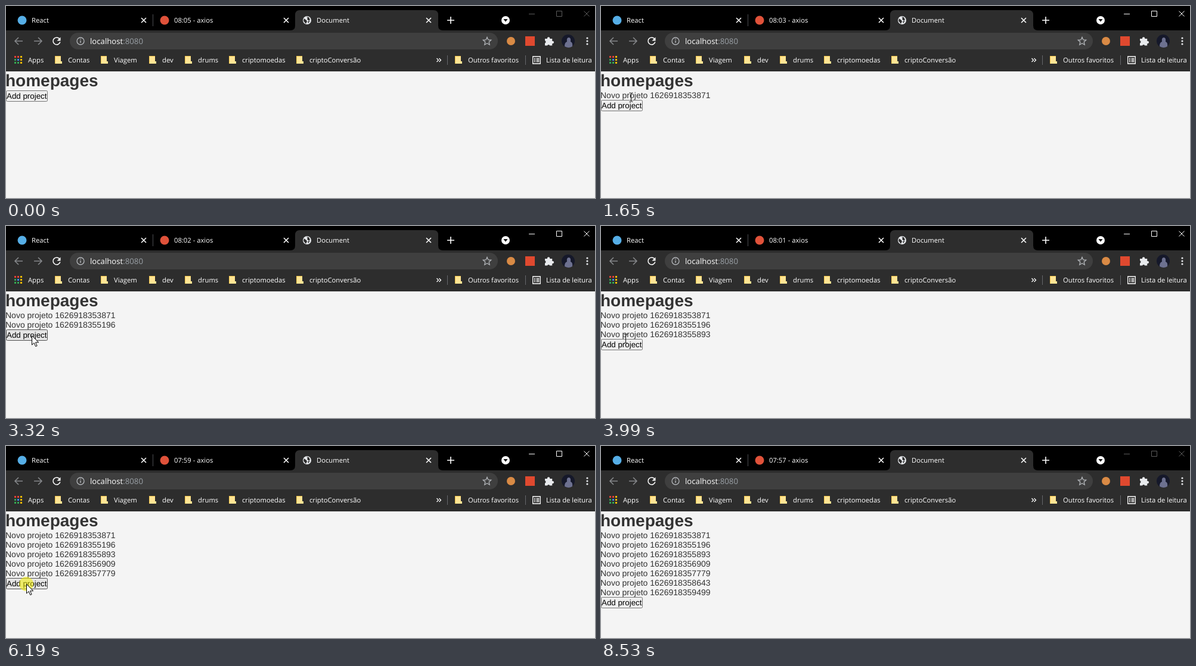
An HTML page that plays this animation: 988 px wide and 323 px high, repeating every 8660 ms.

```html
<!DOCTYPE html>
<html lang="pt">
<head>
<meta charset="utf-8">
<title>homepages</title>
<style>
  html, body { margin: 0; width: 100%; height: 100%; overflow: hidden; background: #f4f4f4; }
  svg { display: block; width: 988px; height: 323px; }
  text { white-space: pre; text-rendering: geometricPrecision; }
  .ui { font: 11.25px "Open Sans", "Noto Sans", sans-serif; fill: #fff; }
  .url { font-size: 13.2px; }
  .page { font: 14px "Liberation Sans", Arial, sans-serif; fill: #333; }
  .page .title { font-weight: bold; font-size: 28px; }
  .page .label { font-size: 13.333px; fill: #000; }
  .line { fill: none; stroke: #fff; stroke-width: 1.6; }
  .dim { stroke: #85878a; }
  #button rect { fill: #efefef; stroke: #767676; }
  #button.hover rect { fill: #e5e5e5; stroke: #4f4f4f; }
  #button.active rect { fill: #f5f5f5; stroke: #8d8d8d; }
  #win { fill: none; stroke: #fff; }
  #win.idle { stroke: #5c5c5c; }
</style>
</head>
<body>
<svg viewBox="0 0 988 323">
  <rect width="988" height="323" fill="#f4f4f4"/>

  <g class="page">
    <text class="title" x="-1" y="135">homepages</text>
    <g id="list"></g>
    <g id="button">
      <rect x=".5" y=".5" width="69" height="18" rx="2"/>
      <text class="label" x="1" y="14">Add project</text>
    </g>
  </g>

  <!-- tab strip -->
  <rect width="988" height="41"/>
  <rect y="41" width="988" height="69" fill="#2d2d2d"/>
  <path d="M477 41q8 0 8-8V15q0-8 8-8H717q8 0 8 8V33q0 8 8 8z" fill="#2d2d2d"/>
  <path d="M246.500 14V34" stroke="#4a4c50"/>
  <circle cx="27" cy="24" r="7.500" fill="#56aee6"/>
  <circle cx="266" cy="24" r="7.500" fill="#e0523a"/>
  <g fill="#2d2d2d">
    <circle cx="505" cy="24" r="7" fill="#e8eaed"/>
    <path d="M500 21l4 3 1 2-2 4-4-5zM504 18l4 1 2 4-2 2-3-3 1-2zM506 26l4-1-3 4z"/>
  </g>
  <path class="line" d="M740 24h12M746 18v12" stroke-width="1.800"/>
  <circle cx="838" cy="24" r="7" fill="#fff"/>
  <path d="M834.500 22h7l-3.500 4.500z"/>
  <g id="win" class="idle">
    <path d="M877 13.500h10M923.500 8.500h9v9h-9zM969.500 8.500l9 9m0-9l-9 9"/>
  </g>

  <!-- toolbar -->
  <path class="line dim" d="M28 59H15M21 53l-6 6 6 6M47 59h13M54 53l6 6-6 6"/>
  <path class="line" d="M89.500 55a6 6 0 1 0 1.300 5.500"/>
  <path d="M91.500 52.500v6h-6z" fill="#fff"/>
  <rect x="107" y="45" width="718" height="28" rx="14" fill="#3f3f3f"/>
  <circle class="line" cx="125" cy="59" r="6" style="stroke:#b4b7bb;stroke-width:1.300"/>
  <path d="M125 58v4M125 55v1.500" stroke="#b4b7bb" stroke-width="1.400"/>
  <path class="line" style="stroke:#b4b7bb;stroke-width:1.300"
    d="M807 52.500l1.900 4.400 4.800.4-3.600 3.200 1.100 4.700-4.200-2.500-4.200 2.500 1.100-4.700-3.600-3.200 4.800-.4z"/>
  <circle cx="847" cy="59" r="7" fill="#d98a45"/>
  <rect x="871" y="51" width="16" height="16" fill="#e0492f"/>
  <path fill="#e8eaed" d="M904 55h4a2.200 2.200 0 1 1 4.200 0h4v4a2.200 2.200 0 1 1 0 4.200v3.300h-4a2.200 2.200 0 0 0-4.200 0h-4v-4a2.200 2.200 0 0 0 0-4.200z"/>
  <circle cx="943" cy="59" r="11" fill="#15182a"/>
  <path d="M937 68q0-7 4-8-1-7 3-7t3 7q4 1 3 8-6 4-13 0z" fill="#6d7190"/>
  <g fill="#e8eaed">
    <circle cx="975" cy="54" r="1.600"/><circle cx="975" cy="59" r="1.600"/><circle cx="975" cy="64" r="1.600"/>
  </g>

  <!-- bookmarks bar -->
  <path d="M740.500 83v16M871.500 83v16" stroke="#66686b"/>
  <path class="line" style="stroke-width:1.300" d="M722.500 88l3 3-3 3M726.500 88l3 3-3 3"/>
  <path class="line" style="stroke-width:1.300" d="M883.700 85h12.600v12h-12.600zM886 88.500h2M886 91h2M886 93.500h2M889.500 88.500h5M889.500 91h5M889.500 93.500h5"/>
  <g id="chrome" class="ui"></g>
  <text class="ui url" x="141" y="64">localhost<tspan fill="#9aa0a6">:8080</tspan></text>
  <text class="ui" id="clock" x="282" y="28"></text>

  <circle id="glow" r="12" fill="#f4ee00" fill-opacity=".55"/>
  <path id="arrow" d="M.5 .5v15.500l3.600-3.400 2.600 6 2.400-1-2.600-5.800h5.200z" fill="#fff" stroke="#000"/>
  <path id="beam" d="M-3-7.500H-1L0-6.500 1-7.500H3M0-6.500V6.500M-3 7.500H-1L0 6.500 1 7.500H3" transform="translate(.5 .5)" fill="none" stroke="#111"/>
</svg>

<script>
const LOOP = 8660, TOP = 142, ROW = 16;
const $ = id => document.getElementById(id);

function add(parent, tag, attrs, text = '') {
  const el = document.createElementNS('http://www.w3.org/2000/svg', tag);
  for (const k in attrs) el.setAttribute(k, attrs[k]);
  el.textContent = text;
  return parent.appendChild(el);
}

const chrome = $('chrome');
const label = (x, y, s) => add(chrome, 'text', { x, y }, s);

label(43, 28, 'React');
label(521, 28, 'Document');
for (const x of [231, 470, 709])
  add(chrome, 'path', { class: 'line', d: `M${x - 4} 20l8 8m0-8l-8 8` });

label(37, 95, 'Apps');
label(906, 95, 'Lista de leitura');
const folders = { Contas: 82, Viagem: 159, dev: 240, drums: 300, criptomoedas: 374,
  'criptoConversão': 487, 'Outros favoritos': 753 };
for (const name in folders) {
  const x = folders[name];
  add(chrome, 'path', { d: `M${x} 84h10v13h-10z`, fill: '#f3c64f' });
  add(chrome, 'path', { d: `M${x + 1} 85h9v8h2v4h-11z`, fill: '#ffe594' });
  label(x + 22, 95, name);
}

const [red, green, blue, yellow] = ['#ea4335', '#34a853', '#4285f4', '#fbbc05'];
[red, red, yellow, green, blue, yellow, green, green, yellow].forEach((fill, i) =>
  add(chrome, 'rect', { x: 14 + i % 3 * 5, y: 84 + Math.floor(i / 3) * 5, width: 3, height: 3, fill }));

// pointer down, button pressed, project added
const clicks = [
  [1370, 1440, 1510], [2710, 2780, 2840], [3400, 3460, 3590], [4470, 4470, 4590],
  [5350, 5350, 5480], [6190, 6260, 6330], [7060, 7060, 7200]
];
const stamps = [53871, 55196, 55893, 56909, 57779, 58643, 59499];
const rows = stamps.map((s, i) =>
  add($('list'), 'text', { x: -1, y: TOP + 13 + i * ROW }, 'Novo projeto 16269183' + s));

// start, end, x, y
const moves = [
  [160, 900, 50, 153], [1980, 2120, 47, 163], [2500, 2520, 46, 164],
  [2950, 3250, 43, 184], [3830, 3990, 42, 189.6], [3990, 4270, 38, 197],
  [4780, 5000, 37, 208], [5000, 5200, 36, 214], [5530, 5650, 34, 224],
  [5680, 5930, 34, 232], [6490, 6860, 34, 247], [7200, 7470, 490, 335]
];

function pointer(t) {
  let x = 785, y = 325;
  for (const [from, to, tx, ty] of moves) {
    if (t < from) break;
    const p = Math.min(1, (t - from) / (to - from)), e = p * p * (3 - 2 * p);
    x += (tx - x) * e;
    y += (ty - y) * e;
  }
  return [x, y];
}

const show = (el, on) => el.setAttribute('visibility', on ? 'visible' : 'hidden');
const place = (el, x, y) => el.setAttribute('transform', `translate(${x} ${y})`);

function draw(t) {
  const [x, y] = pointer(t).map(Math.floor);
  const count = clicks.filter(c => t >= c[2]).length;
  const end = TOP + count * ROW;
  const click = clicks.find(c => t >= c[0] && t < c[2]);

  rows.forEach((r, i) => show(r, i < count));
  place($('button'), 0, end);
  const hover = x < 70 && y >= end && y < end + 19;
  $('button').setAttribute('class', click && t >= click[1] ? 'active' : hover ? 'hover' : '');

  const overText = x < 184 && y >= TOP && y < end;
  show($('arrow'), !overText);
  show($('beam'), overText);
  place($('arrow'), x, y);
  place($('beam'), x + .5, y + .5);
  show($('glow'), click);
  place($('glow'), x, y);

  const left = 485 - Math.floor((t + 360) / 1003);
  const pad = n => String(n).padStart(2, '0');
  $('clock').textContent = `${pad(Math.floor(left / 60))}:${pad(left % 60)} - axios`;
  $('win').setAttribute('class', t >= 1440 && t < 8530 ? '' : 'idle');
}

function tick() {
  draw(performance.now() % LOOP);
  requestAnimationFrame(tick);
}
tick();
</script>
</body>
</html>
```
